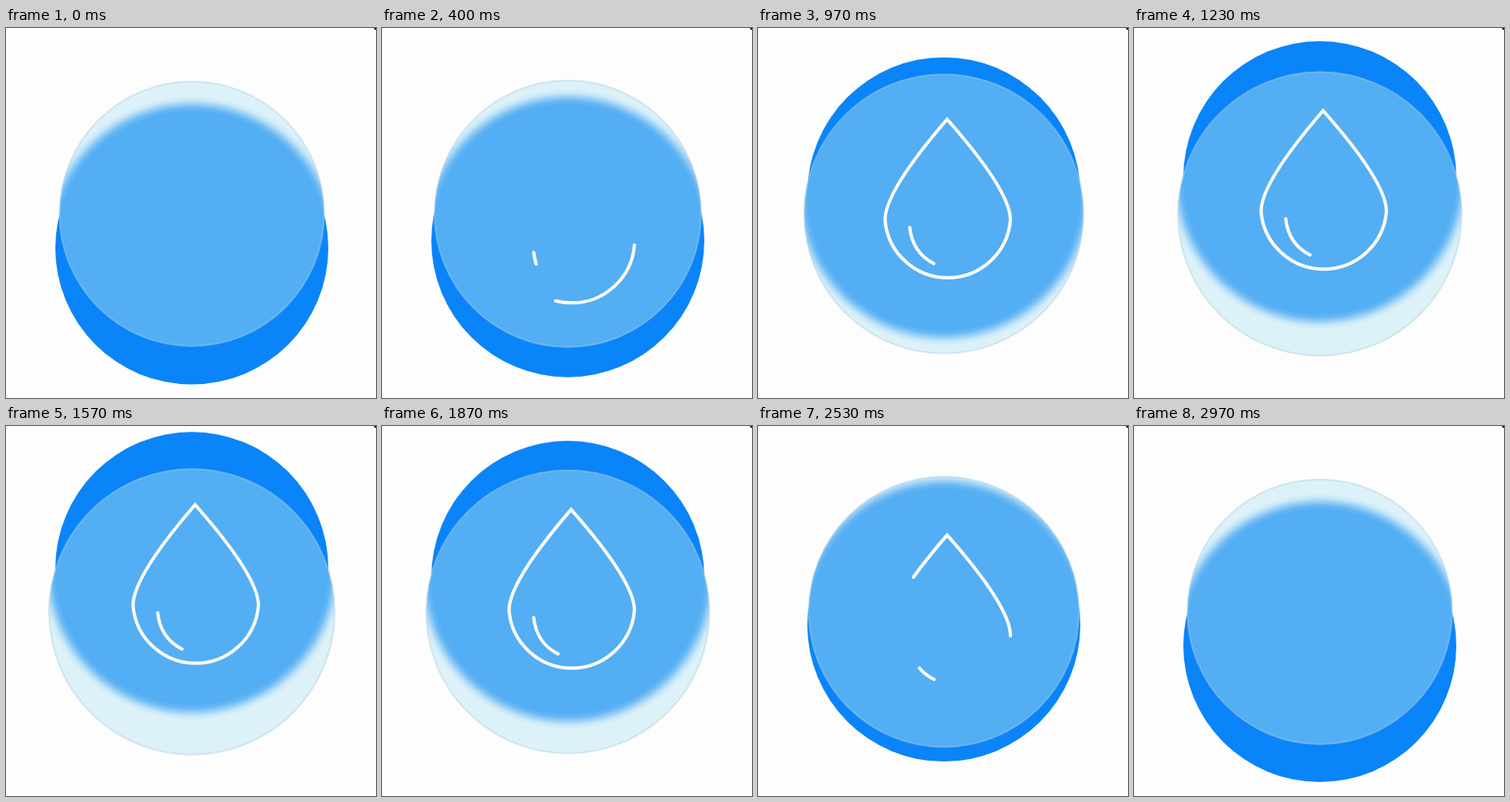
These frames come from a looping animation (450x450 px, 3010 ms). An HTML page:

```html
<!DOCTYPE html>
<html lang="en">
<head>
<meta charset="utf-8">
<title>Water drop</title>
<style>
  html, body { margin: 0; width: 100%; height: 100%; overflow: hidden; background: #fdfdfd; }
  svg { display: block; width: 100vw; height: 100vh; }
</style>
</head>
<body>
<svg viewBox="0 0 450 450">
  <defs>
    <radialGradient id="frost" gradientUnits="userSpaceOnUse" cx="226" cy="267" r="186">
      <stop offset=".887" stop-color="#53aef3"/>
      <stop offset=".914" stop-color="#69b7f4"/>
      <stop offset=".941" stop-color="#98d0f6"/>
      <stop offset=".968" stop-color="#c9e8f8"/>
      <stop offset=".995" stop-color="#ddf1f8"/>
    </radialGradient>
  </defs>
  <path d="M448 0h2v2h-2z"/>
  <circle id="disc" cx="226" r="166" fill="#0a84f9"/>
  <circle id="glass" cx="226" cy="226" fill="url(#frost)" stroke="#a9cfe4" stroke-opacity=".45" stroke-width="2"/>
  <g id="icon" fill="none" stroke="#fff" stroke-width="4" stroke-linecap="round">
    <path pathLength="1" d="M307 223A76.5 76.5 0 0 1 154.500 223C154.500 196 189 148 230 100.500C272 148 307 196 307 223"/>
    <path pathLength="1" d="M184.500 232Q188 263 214 276"/>
  </g>
</svg>
<script>
const LOOP = 3010;
const get = id => document.getElementById(id);
const frost = get('frost'), disc = get('disc'), glass = get('glass'), icon = get('icon');

// Height of the disc's centre over one loop: [ms, y]
const keys = [
  [0, 267.5], [150, 271.5], [350, 263], [570, 241], [730, 225], [1100, 190], [1230, 182],
  [1540, 173], [1870, 184], [2230, 215], [2530, 242], [2700, 257], [2970, 267]
];

function key(i) {
  const n = keys.length, turn = Math.floor(i / n), [t, y] = keys[i - turn * n];
  return [t + turn * LOOP, y];
}

function slope(i) {
  const [t0, y0] = key(i - 1), [t1, y1] = key(i + 1);
  return (y1 - y0) / (t1 - t0);
}

// Smooth periodic curve through the keys
function height(t) {
  let i = keys.length - 1;
  while (keys[i][0] > t) i--;
  const [t0, y0] = key(i), [t1, y1] = key(i + 1);
  const d = t1 - t0, u = (t - t0) / d, v = 1 - u;
  return v * v * ((1 + 2 * u) * y0 + u * d * slope(i)) +
         u * u * ((1 + 2 * v) * y1 - v * d * slope(i + 1));
}

function ease(t, from, to) {
  const p = Math.min(1, Math.max(0, (t - from) / (to - from)));
  return (1 - Math.cos(Math.PI * p)) / 2;
}

function draw(now) {
  const t = now % LOOP, y = height(t);
  disc.setAttribute('cy', y);
  frost.setAttribute('cy', y);
  glass.setAttribute('r', 172.5 - 0.135 * (y - 182));
  icon.setAttribute('transform', `translate(0 ${0.535 * (y - 182)})`);

  const start = ease(t, 2018, 2936), end = ease(t, 90, 1008), shown = end - start;
  icon.setAttribute('visibility', shown > 0.001 ? 'visible' : 'hidden');
  icon.setAttribute('stroke-dasharray', shown > 0.999 ? 'none' : `${shown} 9`);
  icon.setAttribute('stroke-dashoffset', -start);
  requestAnimationFrame(draw);
}
draw(0);
</script>
</body>
</html>
```
